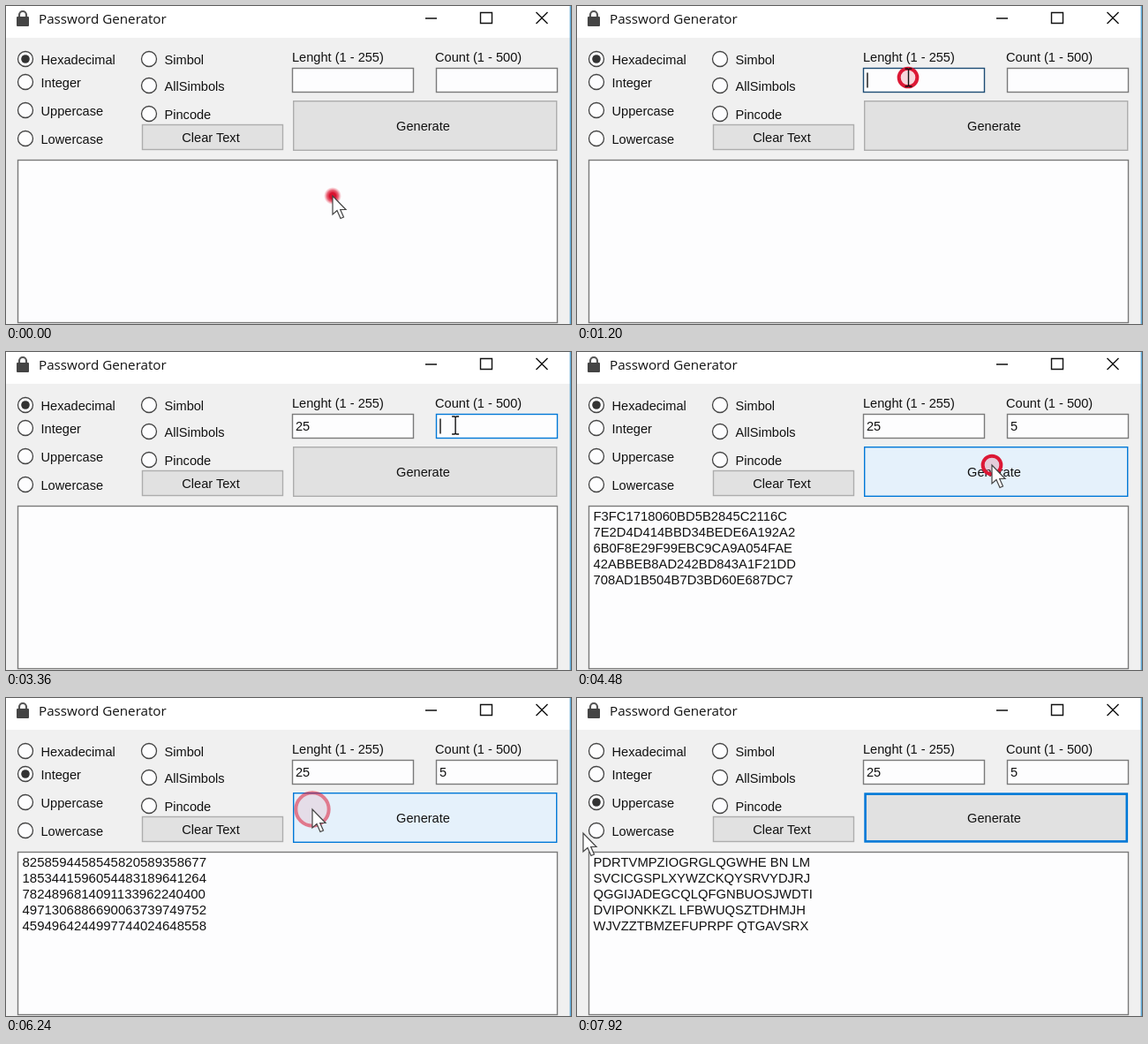
An HTML page that plays this animation: 640x360 px, repeating every 8 s.

```html
<!DOCTYPE html>
<html lang="en">
<head>
<meta charset="utf-8">
<title>Password Generator</title>
<style>
  html, body { margin: 0; width: 100%; height: 100%; overflow: hidden; background: #f0f0f0; }
  svg { display: block; width: 100vw; height: 100vh; }
  text { font: 14.6px "Liberation Sans", Arial, sans-serif; fill: #111; white-space: pre; }
  .title { font: 15.2px "Open Sans", "Noto Sans", sans-serif; }
  .middle { text-anchor: middle; }
  .box { fill: #fdfdfe; stroke: #7a7a7a; stroke-width: 1.4; }
  .button { fill: #e1e1e1; stroke: #adadad; stroke-width: 1.4; }
  .line { fill: none; stroke: #111; stroke-width: 1.4; }
  .radio { fill: #fdfdfe; stroke: #444; stroke-width: 1.3; }
</style>
</head>
<body>
<svg viewBox="0 0 640 360">
  <defs>
    <radialGradient id="glow">
      <stop offset=".35" stop-color="#d9122f"/>
      <stop offset=".65" stop-color="#e2344c" stop-opacity=".75"/>
      <stop offset="1" stop-color="#f07080" stop-opacity="0"/>
    </radialGradient>
  </defs>
  <rect width="640" height="360" fill="#f0f0f0"/>
  <rect width="640" height="36" fill="#fff"/>
  <rect x="638.6" width="1.4" height="360" fill="#5aa5d3"/>

  <path d="M15 13V10a4 4 0 0 1 8 0v3" fill="none" stroke="#555" stroke-width="2.2"/>
  <rect x="12" y="12" width="14" height="11" rx="1" fill="#444"/>
  <text class="title" x="37" y="20">Password Generator</text>
  <path class="line" d="M475 14H488M537.5 7.5h13v12h-13zM600.5 7l13 13M613.5 7l-13 13"/>

  <g id="radios"></g>
  <text x="324" y="63">Lenght (1 - 255)</text>
  <text x="486" y="63">Count (1 - 500)</text>
  <rect id="lengthBox" class="box" x="324.5" y="70.5" width="137" height="27"/>
  <rect id="countBox" class="box" x="487.5" y="70.5" width="137" height="27"/>
  <text id="lengthText" x="328" y="89"></text>
  <text id="countText" x="491" y="89"></text>
  <path id="caret" class="line"/>

  <rect class="button" x="154.5" y="134.5" width="159" height="28"/>
  <text class="middle" x="232" y="154">Clear Text</text>
  <rect id="generate" class="button"/>
  <text class="middle" x="472.5" y="141">Generate</text>

  <rect class="box" x="13.5" y="174.5" width="611" height="184"/>
  <g id="output"></g>

  <circle id="ripple"/>
  <path id="arrow" d="M0 0V21L5 16.5L9 25.5L12.5 24L8.7 15.5H15Z" fill="#fff" stroke="#444" stroke-width="1.2"/>
  <path id="beam" class="line" d="M-4-10h3l1 1 1-1h3M0-9V9M-4 10h3l1-1 1 1h3"/>
</svg>
<script>
const LOOP = 8000, STEP = 80;
const $ = id => document.getElementById(id);
const set = (el, attrs) => { for (const key in attrs) el.setAttribute(key, attrs[key]); };
const add = (parent, tag, attrs, text = '') => {
  const el = document.createElementNS('http://www.w3.org/2000/svg', tag);
  set(el, attrs);
  el.textContent = text;
  return parent.appendChild(el);
};

const dots = [
  ['Hexadecimal', 22, 60], ['Integer', 22, 86], ['Uppercase', 22, 118], ['Lowercase', 22, 150],
  ['Simbol', 162, 60], ['AllSimbols', 162, 90], ['Pincode', 162, 122]
].map(([label, cx, cy]) => {
  add($('radios'), 'circle', { class: 'radio', cx, cy, r: 8.5 });
  add($('radios'), 'text', { x: cx + 17.5, y: cy + 5.5 }, label);
  return add($('radios'), 'circle', { cx, cy, r: 4.8, fill: '#333' });
});

const results = [
  { at: 4480, size: 14.8, lines: ['F3FC1718060BD5B2845C2116C', '7E2D4D414BBD34BEDE6A192A2',
    '6B0F8E29F99EBC9CA9A054FAE', '42ABBEB8AD242BD843A1F21DD', '708AD1B504B7D3BD60E687DC7'] },
  { at: 6080, size: 15, lines: ['8258594458545820589358677', '1853441596054483189641264',
    '7824896814091133962240400', '4971306886690063739749752', '4594964244997744024648558'] },
  { at: 7440, size: 14.8, lines: ['PDRTVMPZIOGRGLQGWHE BN LM', 'SVCICGSPLXYWZCKQYSRVYDJRJ',
    'QGGIJADEGCQLQFGNBUOSJWDTI', 'DVIPONKKZL LFBWUQSZTDHMJH', 'WJVZZTBMZEFUPRPF QTGAVSRX'] }
];
for (const result of results) {
  result.group = add($('output'), 'g', {});
  result.lines.forEach((line, i) =>
    add(result.group, 'text', { x: 18.5, y: 191 + i * 18, style: `font-size:${result.size}px` }, line));
}

// Pointer stops: time, x, y
const stops = [
  [0, 370, 215], [240, 370, 215], [880, 375, 81], [1120, 375, 81], [1280, 376, 81],
  [2400, 376, 81], [2640, 484, 86], [2800, 508, 83], [3840, 510, 83], [4240, 470, 128],
  [4640, 470, 128], [5280, 41, 99], [5440, 21, 86], [5600, 21, 86], [5920, 347, 126],
  [6320, 347, 126], [6640, 32, 118], [6800, 32, 118], [7040, 383, 102], [7200, 410, 126],
  [7440, 410, 126], [7920, 7, 153]
];
const clicks = [0, 1040, 2880, 4320, 5520, 5920, 6720, 7280];
const RIPPLE = 480;

function pointerAt(t) {
  const i = stops.findIndex(stop => stop[0] > t);
  if (i < 0) return stops[stops.length - 1].slice(1);
  const [t0, x0, y0] = stops[i - 1], [t1, x1, y1] = stops[i];
  const p = (t - t0) / (t1 - t0), e = p * p * (3 - 2 * p);
  return [x0 + (x1 - x0) * e, y0 + (y1 - y0) * e];
}

const within = (x, y, left, top, right, bottom) => x >= left && x <= right && y >= top && y <= bottom;
const show = (el, on) => { el.style.display = on ? '' : 'none'; };

function focusAt(t) {
  const order = ['radio', 'length', 'count', 'generate', 'radio', 'generate', 'radio', 'generate'];
  return order[clicks.filter(at => at <= t).length - 1];
}

function drawRipple(t) {
  const start = clicks.filter(at => at <= t).pop(), age = t - start;
  show($('ripple'), age < RIPPLE);
  const [cx, cy] = pointerAt(start);
  if (age < 80) {
    set($('ripple'), { cx, cy, r: 10, fill: 'url(#glow)', stroke: 'none', opacity: 1 });
  } else {
    const p = age / RIPPLE;
    set($('ripple'), {
      cx, cy, r: 2 + 25 * p, fill: 'rgba(225,40,65,.18)', stroke: '#dc1835',
      'stroke-width': 4, opacity: Math.min(1, 1.35 * (1 - p) + .1)
    });
  }
}

function drawFields(t, x, y, focus) {
  const fields = [['length', 324, 1040], ['count', 487, 2880]];
  for (const [name, left, focusedAt] of fields) {
    const hover = within(x, y, left, 70, left + 138, 98);
    const fading = t < focusedAt + 240;
    $(name + 'Box').style.stroke =
      focus === name ? (fading ? '#1d4c74' : '#0078d7') : hover ? '#333' : '#7a7a7a';
  }
  const length = t < 1920 ? '' : t < 2160 ? '2' : '25';
  const count = t < 3600 ? '' : '5';
  $('lengthText').textContent = length;
  $('countText').textContent = count;

  const inLength = focus === 'length';
  const typed = inLength ? length : count;
  const since = [1040, 1920, 2160, 2880, 3600].filter(at => at <= t).pop();
  show($('caret'), (inLength || focus === 'count') && (t - since) % 1060 < 530);
  set($('caret'), { d: `M${(inLength ? 329 : 492) + typed.length * 8.1} 75.5v17` });
}

function drawGenerate(t, x, y, focus) {
  const hover = within(x, y, 325, 107, 624, 164);
  const pressed = hover && clicks.some(at => t >= at && t < at + 160);
  const fading = t >= 7040 && t < 7120;
  const thick = focus === 'generate' && !hover;
  const inset = thick ? .9 : 0;
  set($('generate'), { x: 325.7 + inset, y: 107.7 + inset, width: 298 - 2 * inset, height: 55.6 - 2 * inset });
  const style = $('generate').style;
  style.fill = pressed ? '#cce4f7' : hover ? '#e5f1fb' : fading ? '#e1e5e8' : '#e1e1e1';
  style.stroke = pressed ? '#005499' : hover || thick ? '#0078d7' : fading ? '#9bb0bf' : '#adadad';
  style.strokeWidth = thick ? 2.6 : 1.4;
}

function draw(t) {
  const [x, y] = pointerAt(t), focus = focusAt(t);
  const selected = t < 5600 ? 0 : t < 6800 ? 1 : 2;
  dots.forEach((dot, i) => show(dot, i === selected));
  results.forEach((result, i) => {
    const next = results[i + 1];
    show(result.group, t >= result.at && (!next || t < next.at));
  });
  drawFields(t, x, y, focus);
  drawGenerate(t, x, y, focus);
  drawRipple(t);

  const overField = within(x, y, 324, 70, 462, 98) || within(x, y, 487, 70, 625, 98);
  show($('beam'), overField);
  show($('arrow'), !overField);
  set(overField ? $('beam') : $('arrow'), { transform: `translate(${x} ${y})` });
}

const begin = performance.now();
function tick() {
  const t = (performance.now() - begin) % LOOP;
  draw(Math.floor(t / STEP) * STEP);
  requestAnimationFrame(tick);
}
tick();
</script>
</body>
</html>
```
